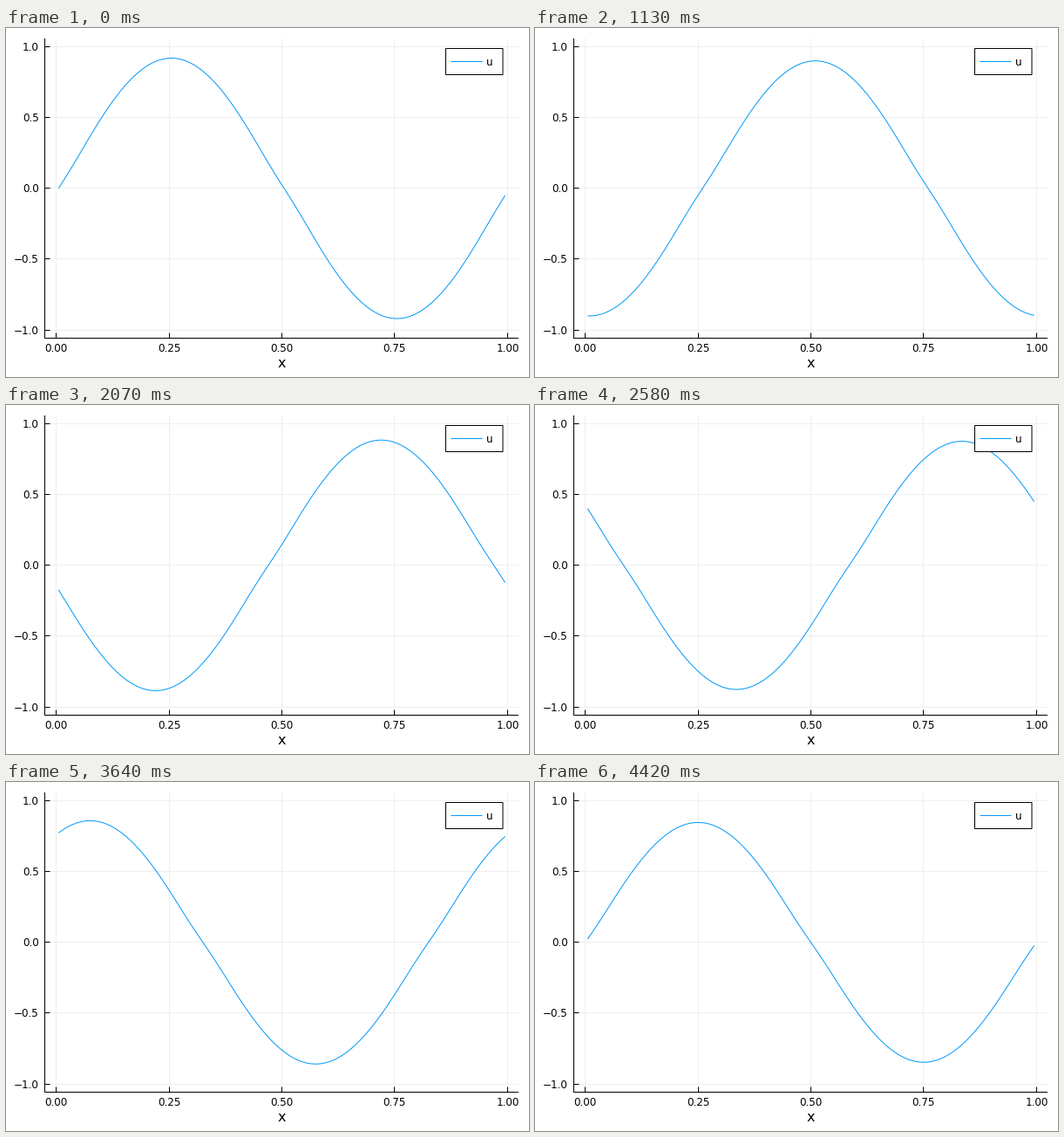
Animation of 600 by 400 pixels, one loop 4.44 s. Source, as a matplotlib script:

```python
import matplotlib.pyplot as plt
import numpy as np
from matplotlib.animation import FuncAnimation
from matplotlib.patches import Rectangle

W, H, DPI = 600, 400, 100
PX = 72 / DPI                      # one pixel in points
LOOP, TICK = 4440, 10              # ms
STEP_RATE = 45                     # wave steps per second
LEFT, RIGHT, TOP, BOTTOM = 44.5, 588, 12, 355.5
TICK_LEN = 6
BLUE = "#009afa"
GRID = "#eeeeee"

plt.rcParams["font.family"] = "DejaVu Sans"
fig = plt.figure(figsize=(W / DPI, H / DPI), dpi=DPI, facecolor="white")
ax = fig.add_axes([0, 0, 1, 1])
ax.set_xlim(0, W)
ax.set_ylim(H, 0)
ax.axis("off")


def to_px(x):
    return 57.7 + 517.5 * x


def to_py(u):
    return 183.8 - 162.25 * u


def crisp(v):
    """Centre of the pixel that holds v."""
    return np.floor(v) + 0.5


def line(xs, ys, color="black", z=3):
    return ax.plot(xs, ys, color=color, lw=PX, zorder=z, snap=False,
                   solid_capstyle="butt")[0]


def label(x, y, text, size=12, ha="center", z=3):
    ax.text(x, y, text, fontsize=size * PX, ha=ha, va="baseline", zorder=z)


def wave(s):
    """Sine-like profile of period 1, a little flatter around its zeros."""
    d = np.arcsin(np.sin(2 * np.pi * s)) / (2 * np.pi)
    return np.sin(6.45 * (d - 0.0065 * np.tanh(d / 0.04)))


# Grid, ticks and tick labels
for v in np.linspace(0, 1, 5):
    px = crisp(to_px(v))
    line([px, px], [TOP, BOTTOM], GRID, 1)
    line([px, px], [BOTTOM - TICK_LEN, BOTTOM])
    label(px, 371.3, f"{v:.2f}")
for v in np.linspace(-1, 1, 5):
    py = crisp(to_py(v))
    line([LEFT, RIGHT], [py, py], GRID, 1)
    line([LEFT, LEFT + TICK_LEN], [py, py])
    label(38, py + 4.5, f"{v:.1f}".replace("-", "\u2212"), ha="right")

line([LEFT, LEFT], [TOP, BOTTOM + 0.5])
line([LEFT, RIGHT], [BOTTOM, BOTTOM])
label(316.5, 389.2, "x", 16)

# Legend
ax.add_patch(Rectangle((504.5, 23.5), 65.5, 30, facecolor="white",
                       edgecolor="black", lw=PX, zorder=5, snap=False))
line([510.5, 546.5], [38.5, 38.5], BLUE, 6)
label(551.3, 42.8, "u", ha="left", z=6)

x = (np.arange(100) + 0.5) / 100
curve = line(to_px(x), to_py(0 * x), BLUE, 4)


def update(k):
    step = int((k + 0.5) * TICK * STEP_RATE / 1000)
    shift = 0.005 * (step + 1)
    amp = 0.92 * np.exp(-0.000415 * step)
    curve.set_ydata(to_py(amp * wave(x - shift)))
    return (curve,)


anim = FuncAnimation(fig, update, frames=LOOP // TICK, interval=TICK,
                     repeat=True, repeat_delay=0)
plt.show()
```
